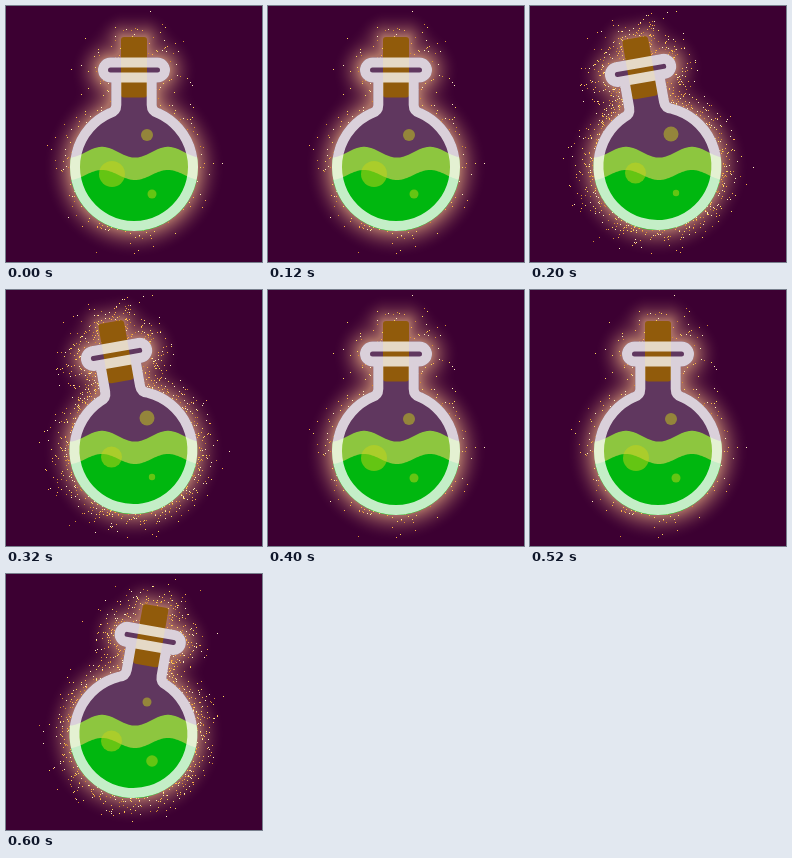
These frames come from a looping animation (256 px wide and 256 px high, 800 ms). An HTML page with a canvas:

```html
<!DOCTYPE html>
<html lang="en">
<head>
<meta charset="utf-8">
<title>Potion</title>
<style>
  html, body { margin: 0; width: 100%; height: 100%; overflow: hidden; background: #3c0032; }
  canvas { display: block; width: 100vw; height: 100vh; }
</style>
</head>
<body>
<canvas id="stage" width="256" height="256"></canvas>
<script>
const SIZE = 256, STEP = 200, TAU = Math.PI * 2;
const BG = [60, 0, 50], GLOW = [255, 196, 140];
const SPARKS = [[255, 214, 90], [255, 176, 70], [255, 238, 190], [214, 140, 50]];
const INSIDE = '#60375f';

// bubbles are [x, y, radius]
const upright = { x: 128, y: 161, tilt: 0, sparks: 0.025, seed: 7,
  bubbles: [[141, 129, 6], [106, 168, 13], [146, 188, 4.5]] };
const left = { x: 127.4, y: 160, tilt: -10, sparks: 0.1, seed: 21,
  bubbles: [[141, 128, 7.5], [105.5, 167, 10.5], [146, 187, 3.2]] };
const right = { x: 127.4, y: 160, tilt: 10, sparks: 0.1, seed: 43,
  bubbles: [[141, 128, 4.5], [105.5, 167, 10.5], [146, 187, 5.8]] };
const poses = [upright, left, upright, right];

function layer() {
  const c = document.createElement('canvas');
  c.width = c.height = SIZE;
  return c;
}

function random(seed) {
  return () => {
    seed = (seed + 0x6d2b79f5) | 0;
    let t = Math.imul(seed ^ (seed >>> 15), 1 | seed);
    t = (t + Math.imul(t ^ (t >>> 7), 61 | t)) ^ t;
    return ((t ^ (t >>> 14)) >>> 0) / 4294967296;
  };
}

function boxDistance(x, y, cy, w, h, r) {
  const dx = Math.abs(x) - w + r, dy = Math.abs(y - cy) - h + r;
  return Math.hypot(Math.max(dx, 0), Math.max(dy, 0)) + Math.min(Math.max(dx, dy), 0) - r;
}

// Smooth minimum, so that the glow fills the hollows
function blend(distances, k) {
  return -k * Math.log(distances.reduce((sum, d) => sum + Math.exp(-d / k), 0));
}

// Distance to the bottle's silhouette, in its own tilted space
function distance(px, py, pose) {
  const a = -pose.tilt * Math.PI / 180, dx = px - pose.x, dy = py - pose.y;
  const x = dx * Math.cos(a) - dy * Math.sin(a);
  const y = dx * Math.sin(a) + dy * Math.cos(a);
  return blend([
    Math.hypot(x, y) - 64,
    boxDistance(x, y, -97, 36, 12.5, 12.5),
    boxDistance(x, y, -73, 22.5, 24, 0),
    boxDistance(x, y, -100, 13, 30, 3)
  ], 5);
}

function drawGlow(ctx, pose) {
  const img = ctx.createImageData(SIZE, SIZE), rnd = random(pose.seed);
  for (let y = 0; y < SIZE; y++) {
    for (let x = 0; x < SIZE; x++) {
      const d = Math.max(0, distance(x + 0.5, y + 0.5, pose));
      const glow = 0.55 * Math.max(0, 1 - d / 27) ** 2;
      const chance = pose.sparks * Math.max(0, 1 - d / 43) ** 3;
      const spark = rnd() < chance ? SPARKS[Math.floor(rnd() * 4)] : null;
      const i = (y * SIZE + x) * 4;
      for (let k = 0; k < 3; k++) {
        img.data[i + k] = spark ? spark[k] : BG[k] + (GLOW[k] - BG[k]) * glow;
      }
      img.data[i + 3] = 255;
    }
  }
  ctx.putImageData(img, 0, 0);
}

function place(ctx, pose) {
  ctx.translate(pose.x, pose.y);
  ctx.rotate(pose.tilt * Math.PI / 180);
}

const flask = new Path2D(
  'M-17.7 -89V-62Q-17.7 -55.5 -24.5 -53.7A59 59 0 1 0 24.5 -53.7Q17.7 -55.5 17.7 -62V-89');
const lip = new Path2D();
lip.roundRect(-31, -104.5, 62, 15, 7.5);
const cork = new Path2D();
cork.roundRect(-13, -130, 26, 60.5, 3);

function outline(ctx, color) {
  ctx.strokeStyle = color;
  ctx.lineWidth = 10;
  ctx.stroke(flask);
  ctx.stroke(lip);
}

function wave(ctx, level, height, color) {
  ctx.beginPath();
  ctx.moveTo(50, SIZE);
  for (let x = 50; x <= 206; x++) {
    ctx.lineTo(x, level - height * Math.cos((x - 96) / 66 * TAU));
  }
  ctx.lineTo(206, SIZE);
  ctx.fillStyle = color;
  ctx.fill();
}

function circle(ctx, x, y, r) {
  ctx.beginPath();
  ctx.arc(x, y, r, 0, TAU);
}

function drawGlass(pose) {
  const c = layer(), ctx = c.getContext('2d');
  place(ctx, pose);
  outline(ctx, '#fff');
  return c;
}

function drawPose(pose) {
  const c = layer(), ctx = c.getContext('2d');
  drawGlow(ctx, pose);

  ctx.save();
  place(ctx, pose);
  outline(ctx, INSIDE);
  ctx.fillStyle = INSIDE;
  ctx.fill(flask);
  ctx.fill(lip);
  ctx.fillStyle = '#915b0b';
  ctx.fill(cork);
  ctx.restore();

  ctx.save();
  circle(ctx, pose.x, pose.y, 64);
  ctx.clip();
  wave(ctx, 146.2, 5.4, '#8dc63f');
  wave(ctx, 169, 5, '#00b70f');
  ctx.restore();

  ctx.fillStyle = 'rgba(200, 212, 24, 0.5)';
  for (const [x, y, r] of pose.bubbles) {
    circle(ctx, x, y, r);
    ctx.fill();
  }

  ctx.globalAlpha = 0.77;
  ctx.drawImage(drawGlass(pose), 0, 0);
  return c;
}

const pictures = new Map([upright, left, right].map(p => [p, drawPose(p)]));
const stage = document.getElementById('stage').getContext('2d');
const start = performance.now();
let shown = null;

function tick(now) {
  const pose = poses[Math.floor(Math.max(0, now - start) / STEP) % poses.length];
  if (pose !== shown) {
    stage.drawImage(pictures.get(pose), 0, 0);
    shown = pose;
  }
  requestAnimationFrame(tick);
}
tick(start);
</script>
</body>
</html>
```
